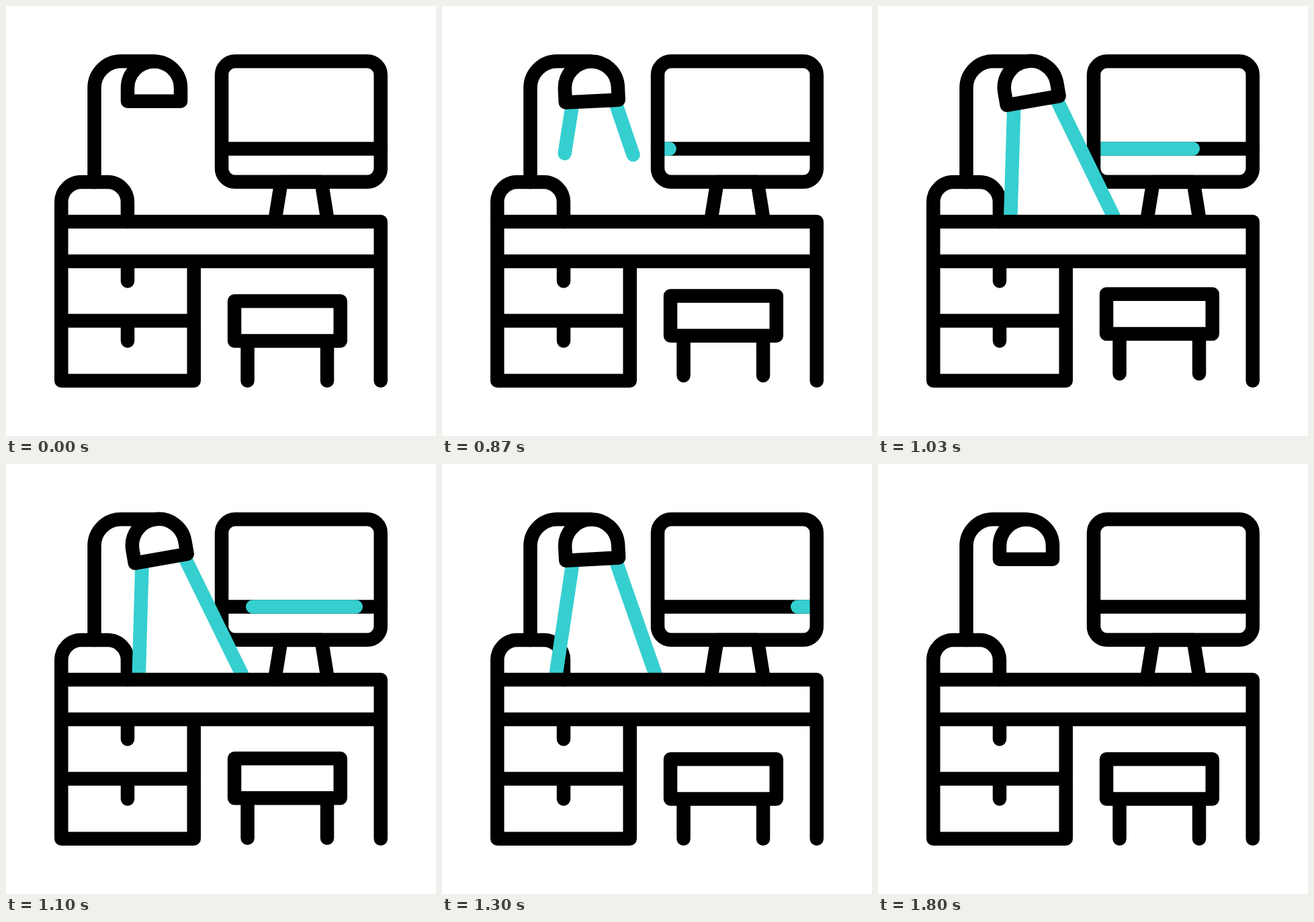
An HTML page for the animation above (2500 ms loop, 640x640 px).

```html
<!DOCTYPE html>
<html lang="en">
<head>
<meta charset="utf-8">
<title>Desk</title>
<style>
  html, body { margin: 0; width: 100%; height: 100%; overflow: hidden; background: #fff; }
  svg { display: block; width: 100%; height: 100%; }
  .ink, .glow { fill: none; stroke: #000; stroke-width: 20.5; stroke-linecap: round; stroke-linejoin: round; }
  .glow { stroke: #36cfd0; }
</style>
</head>
<body>
<svg viewBox="0 0 640 640">
  <clipPath id="above"><path d="M0 0H640V321H0Z"/></clipPath>

  <path class="ink" d="M321 212.4H557.7"/>
  <line class="glow" id="bar" y1="212.4" y2="212.4"/>
  <g class="ink">
    <rect x="321" y="82.3" width="236.7" height="179.5" rx="20"/>
    <path d="M400 321L409.5 262H469.5L479 321"/>
    <path d="M131.5 262V122A39.5 39.5 0 0 1 171 82.3H220"/>
    <path d="M82.3 321V291.5A29.5 29.5 0 0 1 111.8 262H151.4A29.5 29.5 0 0 1 180.9 291.5V321"/>
  </g>

  <g clip-path="url(#above)">
    <g id="beams" class="glow">
      <line id="left"/>
      <line id="right"/>
    </g>
  </g>
  <path class="ink" id="head" d="M181 141.7V122A39.5 39.5 0 0 1 260 122V141.7Z"/>

  <g class="ink">
    <path d="M82.3 321H557.7V557.7M82.3 321V557.7H279.7V380M82.3 380H557.7M82.3 468.6H279.7M181 380V409.5M181 468.6V498.5"/>
    <path id="stool" d="M340 439.3H497.7V498.4H340ZM359.5 498.4V557.7M478 498.4V557.7"/>
  </g>
</svg>
<script>
  const LOOP = 2500, FPS = 30;
  const $ = id => document.getElementById(id);
  const bar = $('bar'), beams = $('beams'), head = $('head'), stool = $('stool');

  const rays = [
    { el: $('left'), from: [190.5, 148.5], to: [156.5, 314] },
    { el: $('right'), from: [255.5, 146.5], to: [309.5, 333] }
  ];

  // Keys are [tick, value] pairs, eased in and out between neighbours.
  function track(keys, f) {
    if (f <= keys[0][0]) return keys[0][1];
    for (let i = 1; i < keys.length; i++) {
      const [a, v] = keys[i - 1], [b, w] = keys[i];
      if (f < b) {
        const x = (f - a) / (b - a);
        return v + (w - v) * x * x * (3 - 2 * x);
      }
    }
    return keys[keys.length - 1][1];
  }

  const tilt = [[23, 0], [32, -10.2], [43, 0]];
  const reach = [[22, 0], [31, 1], [46, 1], [54, 0]];
  const hop = [[23, 0], [29, -15.5], [35, 4], [38, 0]];
  const barEnd = [[24, 321], [36, 557.7]];
  const barStart = [[29.6, 321], [41.6, 557.7]];

  const show = (el, on) => el.setAttribute('visibility', on ? 'visible' : 'hidden');

  function draw(ms) {
    const f = Math.floor((ms % LOOP + 3.4) * FPS / 1000);

    const turn = `rotate(${track(tilt, f)} 220.3 82.3)`;
    head.setAttribute('transform', turn);
    beams.setAttribute('transform', turn);

    show(beams, f >= 22 && f < 54);
    const k = Math.max(track(reach, f), 0.0001);
    for (const { el, from, to } of rays) {
      el.setAttribute('x1', from[0]);
      el.setAttribute('y1', from[1]);
      el.setAttribute('x2', from[0] + (to[0] - from[0]) * k);
      el.setAttribute('y2', from[1] + (to[1] - from[1]) * k);
    }

    show(bar, f > 24 && f < 42);
    bar.setAttribute('x1', track(barStart, f));
    bar.setAttribute('x2', track(barEnd, f));

    stool.setAttribute('transform', `translate(0 ${track(hop, f)})`);
  }

  const t0 = performance.now();
  function tick() {
    draw(performance.now() - t0);
    requestAnimationFrame(tick);
  }
  tick();
</script>
</body>
</html>
```
